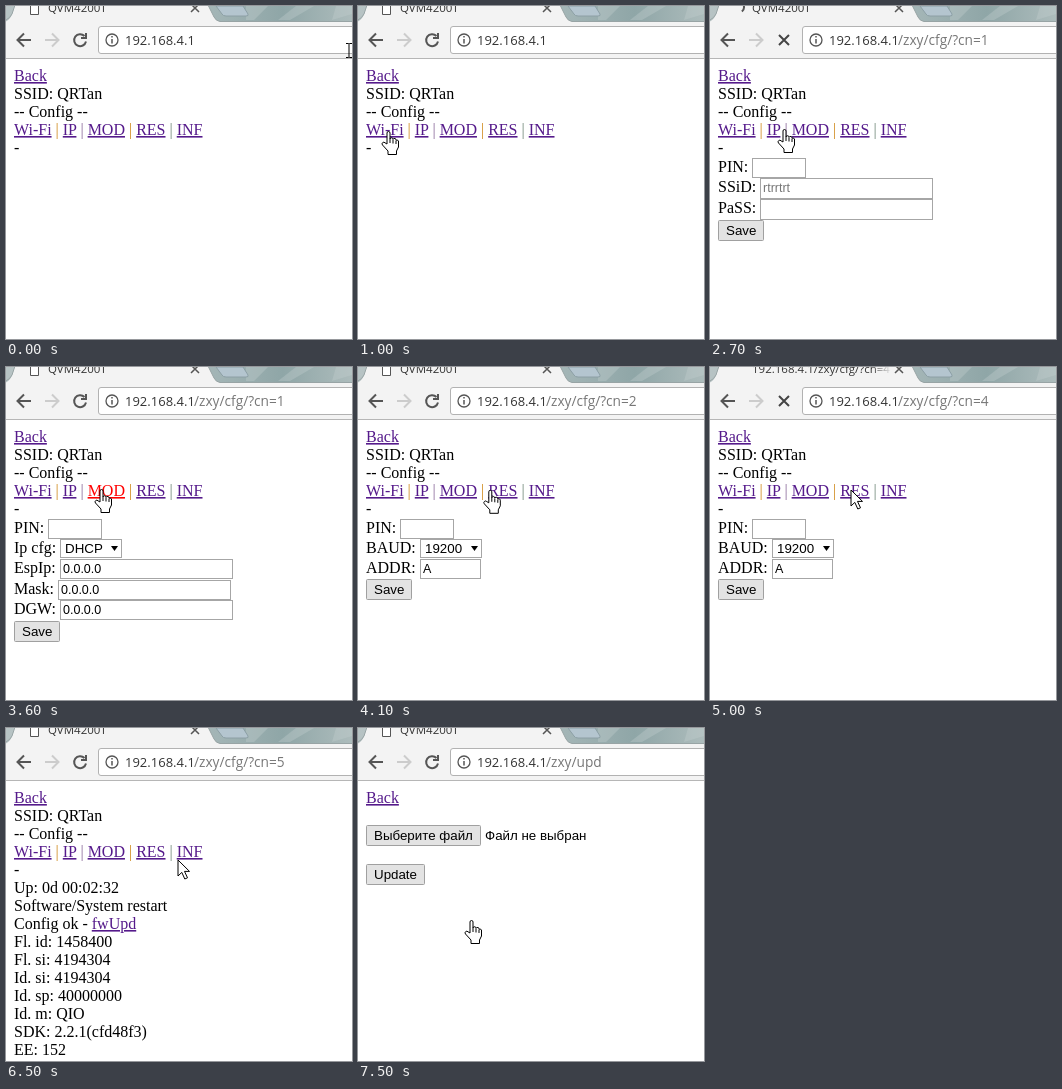
These frames come from a looping animation (346 px wide and 333 px high, 8 s). An HTML page:

```html
<!DOCTYPE html>
<html lang="en">
<head>
<meta charset="utf-8">
<style>
  html, body { margin: 0; width: 100%; height: 100%; overflow: hidden; background: #fff; }
  svg { display: block; width: 346px; height: 333px; }
  text { white-space: pre; }
  .page { font: 16px "Liberation Serif", serif; }
  .ui { font: 13.33px "Liberation Sans", sans-serif; }
  .value { font-size: 12.5px; }
  .bar { font: 13px "Open Sans", sans-serif; }
  .link { fill: #551a8b; text-decoration: underline; }
  .link.active { fill: #f00; }
</style>
</head>
<body>
<svg viewBox="0 0 346 333">
  <defs>
    <linearGradient id="strip">
      <stop offset="0" stop-color="#b7c3c4"/>
      <stop offset=".6" stop-color="#a3b5b6"/>
      <stop offset=".8" stop-color="#8fa6a7"/>
      <stop offset="1" stop-color="#adbcbc"/>
    </linearGradient>
    <linearGradient id="fade">
      <stop offset="0" stop-color="#f3f3f3" stop-opacity="0"/>
      <stop offset="1" stop-color="#f3f3f3"/>
    </linearGradient>
  </defs>
  <rect width="346" height="333" fill="#fff"/>
  <g id="chrome">
    <rect width="346" height="16" fill="url(#strip)"/>
    <path d="M240 0h22l-14 14h-8zM290 0h18l-24 14h-12zM330 0h16v8l-20 6z" fill="#c3cfce" opacity=".35"/>
    <path d="M210 0h27l5 8q1 2-2 2h-20q-3 0-4-2z" fill="#b4c5cf" stroke="#8c9fa5"/>
    <path d="M0 15.5q4-2 6-7L9-1H202l6 12q2 4 6 4.500H346V53H0z" fill="#f3f3f3"/>
    <path d="M0 14q4-2 6-6L9-1M202-1l6 12q2 4 6 4.500H346" fill="none" stroke="#98a4a5"/>
    <path d="M0 52.500H346" stroke="#b6b6b6"/>
    <path id="doc" d="M24.500-3v11.500h8V-3" fill="#fff" stroke="#555"/>
    <path id="spinner" d="M5.600-2A6 6 0 0 1 3.900 4.600" fill="none" stroke="#555" stroke-width="2"/>
    <text id="title" x="42" y="6" class="bar" style="font-size:11.5px" fill="#333"></text>
    <rect x="162" width="20" height="10" fill="url(#fade)"/>
    <rect x="182" width="20" height="10" fill="#f3f3f3"/>
    <path d="M185-2l8 8m0-8l-8 8" stroke="#555" stroke-width="1.500"/>
    <g fill="none" stroke-width="2">
      <path d="M25 34H12m6-6.500L11.500 34l6.500 6.500" stroke="#555"/>
      <path d="M39 34h13m-6-6.500L52.500 34 46 40.500" stroke="#ccc"/>
      <path id="reload" d="M78.500 30A6 6 0 1 0 80 35.500M80 27v5h-5" stroke="#555"/>
      <path id="stop" d="M69 29l10 10m0-10l-10 10" stroke="#444"/>
    </g>
    <path d="M348 20.500H95q-2.500 0-2.500 2.500v22q0 2.500 2.500 2.500H348" fill="#fff" stroke="#b2b2b2"/>
    <circle cx="106" cy="34" r="6" fill="none" stroke="#555" stroke-width="1.300"/>
    <path d="M106 33v4.500m0-7.500v1.600" stroke="#555" stroke-width="1.500"/>
    <text x="119" y="39" class="bar" fill="#333">192.168.4.1</text>
    <text id="path" x="188" y="39" class="bar" style="font-size:13.7px" fill="#777"></text>
  </g>
  <g class="page">
    <text x="8" y="75" class="link">Back</text>
    <g id="menu"></g>
    <g id="content"></g>
  </g>
  <g id="cursor" stroke="#000" fill="#fff" stroke-linejoin="round">
    <path data-shape="arrow" d="M0 0v16l3.800-3.600 3 6.600 2.700-1.200-3-6.400h5z"/>
    <path data-shape="hand" transform="translate(-6.500 0)" d="M5.500 13V2a1.500 1.500 0 0 1 3 0v6a1.500 1.500 0 0 1 3 .5 1.500 1.500 0 0 1 3 1 1.500 1.500 0 0 1 2.500 1.500v5l-2 4v3.500h-8.500V20L1 14a1.600 1.600 0 0 1 2.500-2.200zM8.500 8v4M11.500 9v3.500M14.500 10v3"/>
    <path data-shape="beam" fill="none" d="M-3-6.500h2.500L0-6l.5-.5H3M-3 7.500h2.500L0 7l.5.5H3M0-6V7"/>
  </g>
</svg>
<script>
const LOOP = 8000, STEP = 100;
const $ = id => document.getElementById(id);

const text = (x, y, s, attrs = '') => `<text x="${x}" y="${y}" ${attrs}>${s}</text>`;
const link = (id, s) => `<tspan class="link" id="${id}">${s}</tspan>`;
const box = (x, y, w, h, fill = '#fff', stroke = '#a6a6a6', r = 0) =>
  `<rect x="${x + .5}" y="${y + .5}" width="${w - 1}" height="${h - 1}" rx="${r}" fill="${fill}" stroke="${stroke}"/>`;
const input = (label, x, y, w, value = '', fill = '#000', h = 20) =>
  text(8, y + 14, label) + box(x, y, w, h) + text(x + 3, y + 14, value, `class="ui value" fill="${fill}"`);
const select = (label, x, y, value) =>
  text(8, y + 14, label) + box(x, y, 62, 19) + text(x + 5, y + 14, value, 'class="ui"') +
  `<path d="M${x + 51} ${y + 7}h7l-3.500 5z"/>`;
const button = (label, y, w) =>
  box(8, y, w, 21, '#e3e3e3', '#a0a0a0', 1) + text(16, y + 15, label, 'class="ui"');
const lines = (y, list) => list.map((s, i) => text(8, y + 18 * i, s)).join('');
const pin = input('PIN:', 42, 152, 54);
const bar = color => `<tspan fill="${color}"> | </tspan>`;

const pages = {
  home: '',
  wifi: pin + input('SSiD:', 50, 172, 173, 'rtrrtrt', '#777', 21) +
    input('PaSS:', 50, 193, 173, '', '#000', 21) + button('Save', 214, 46),
  ip: pin + select('Ip cfg:', 54, 172, 'DHCP') + input('EspIp:', 54, 192, 173, '0.0.0.0') +
    input('Mask:', 52, 213, 173, '0.0.0.0') + input('DGW:', 54, 233, 173, '0.0.0.0') + button('Save', 254, 46),
  mod: pin + select('BAUD:', 62, 172, '19200') + input('ADDR:', 62, 192, 61, 'A') + button('Save', 212, 46),
  res: pin + button('Restart', 172, 60),
  inf: lines(165, ['Up: 0d 00:02:32', 'Software/System restart', 'Config ok - ' + link('upd', 'fwUpd'),
    'Fl. id: 1458400', 'Fl. si: 4194304', 'Id. si: 4194304', 'Id. sp: 40000000', 'Id. m: QIO',
    'SDK: 2.2.1(cfd48f3)', 'EE: 152']),
  upd: button('Выберите файл', 97, 115) + text(127, 112, 'Файл не выбран', 'class="ui"') +
    button('Update', 136, 59)
};

$('menu').innerHTML = lines(93, ['SSID: QRTan', '-- Config --',
  link('wifi', 'Wi-Fi') + bar('#d08a1c') + link('ip', 'IP') + bar('#8a6a9a') + link('mod', 'MOD') +
  bar('#d08a1c') + link('res', 'RES') + bar('#708878') + link('inf', 'INF'), '-']);
$('content').innerHTML = Object.entries(pages)
  .map(([name, body]) => `<g data-page="${name}">${body}</g>`).join('');

// Each visit: press, request sent, address shown as title, page shown
const visits = [
  { page: 'wifi', path: '/zxy/cfg/?cn=0', press: 1100, send: 1100, name: 1200, show: 1300 },
  { page: 'ip', path: '/zxy/cfg/?cn=1', press: 2400, send: 2500, name: 2800, show: 3000 },
  { page: 'mod', path: '/zxy/cfg/?cn=2', press: 3600, send: 3700, name: 3900, show: 4000 },
  { page: 'res', path: '/zxy/cfg/?cn=4', press: 4800, send: 4900, name: 5000, show: 5200 },
  { page: 'inf', path: '/zxy/cfg/?cn=5', press: 6000, send: 6100, name: 6200, show: 6400 },
  { page: 'upd', path: '/zxy/upd', press: 7300, send: 7400, name: 7400, show: 7500 }
];

// time, x, y, shape from then on
const track = [
  [0, 343, 44, 'beam'], [100, 290, 60, 'arrow'], [200, 219, 77, 'arrow'], [300, 146, 100, 'arrow'],
  [600, 30, 125, 'hand'], [1400, 30, 125, 'hand'], [1900, 60, 121, 'hand'], [2500, 62, 121, 'hand'],
  [2700, 74, 123, 'hand'], [3100, 95, 122, 'hand'], [3700, 95, 122, 'hand'], [4200, 141, 123, 'hand'],
  [4900, 141, 123, 'arrow'], [5100, 141, 123, 'arrow'], [5400, 182, 123, 'hand'],
  [6100, 182, 123, 'arrow'], [6400, 176, 128, 'arrow'], [6500, 172, 132, 'arrow'],
  [6800, 113, 172, 'arrow'], [7100, 113, 192, 'hand'], [LOOP, 113, 192, 'hand']
];

const show = (el, on) => { el.style.display = on ? '' : 'none'; };
const pageGroups = [...document.querySelectorAll('[data-page]')];
const shapes = [...document.querySelectorAll('[data-shape]')];
const links = [...document.querySelectorAll('tspan.link')];

function moveCursor(t) {
  const i = track.findIndex(k => k[0] > t) - 1;
  const [t0, x0, y0, shape] = track[i], [t1, x1, y1] = track[i + 1];
  const u = (t - t0) / (t1 - t0);
  $('cursor').setAttribute('transform', `translate(${x0 + (x1 - x0) * u} ${y0 + (y1 - y0) * u})`);
  shapes.forEach(s => show(s, s.dataset.shape === shape));
}

function draw(ms) {
  const t = Math.floor(ms % LOOP / STEP) * STEP;
  const shown = visits.filter(v => t >= v.show).pop();
  const sent = visits.filter(v => t >= v.send).pop();
  const pressed = visits.find(v => t >= v.press && t < v.send);
  const page = shown ? shown.page : 'home';
  const loading = sent !== shown;

  pageGroups.forEach(g => show(g, g.dataset.page === page));
  show($('menu'), page !== 'upd');
  links.forEach(l => l.classList.toggle('active', !!pressed && l.id === pressed.page));
  $('path').textContent = sent ? sent.path : '';
  $('title').textContent = loading && t >= sent.name ? '192.168.4.1' + sent.path : 'QVM4200T';
  show($('doc'), !loading);
  show($('reload'), !loading);
  show($('spinner'), loading);
  show($('stop'), loading);
  $('spinner').setAttribute('transform', `translate(28 1) rotate(${(2700 - t) * .1957})`);
  moveCursor(t);
}

const start = performance.now();
(function tick() {
  draw(performance.now() - start);
  requestAnimationFrame(tick);
})();
</script>
</body>
</html>
```
